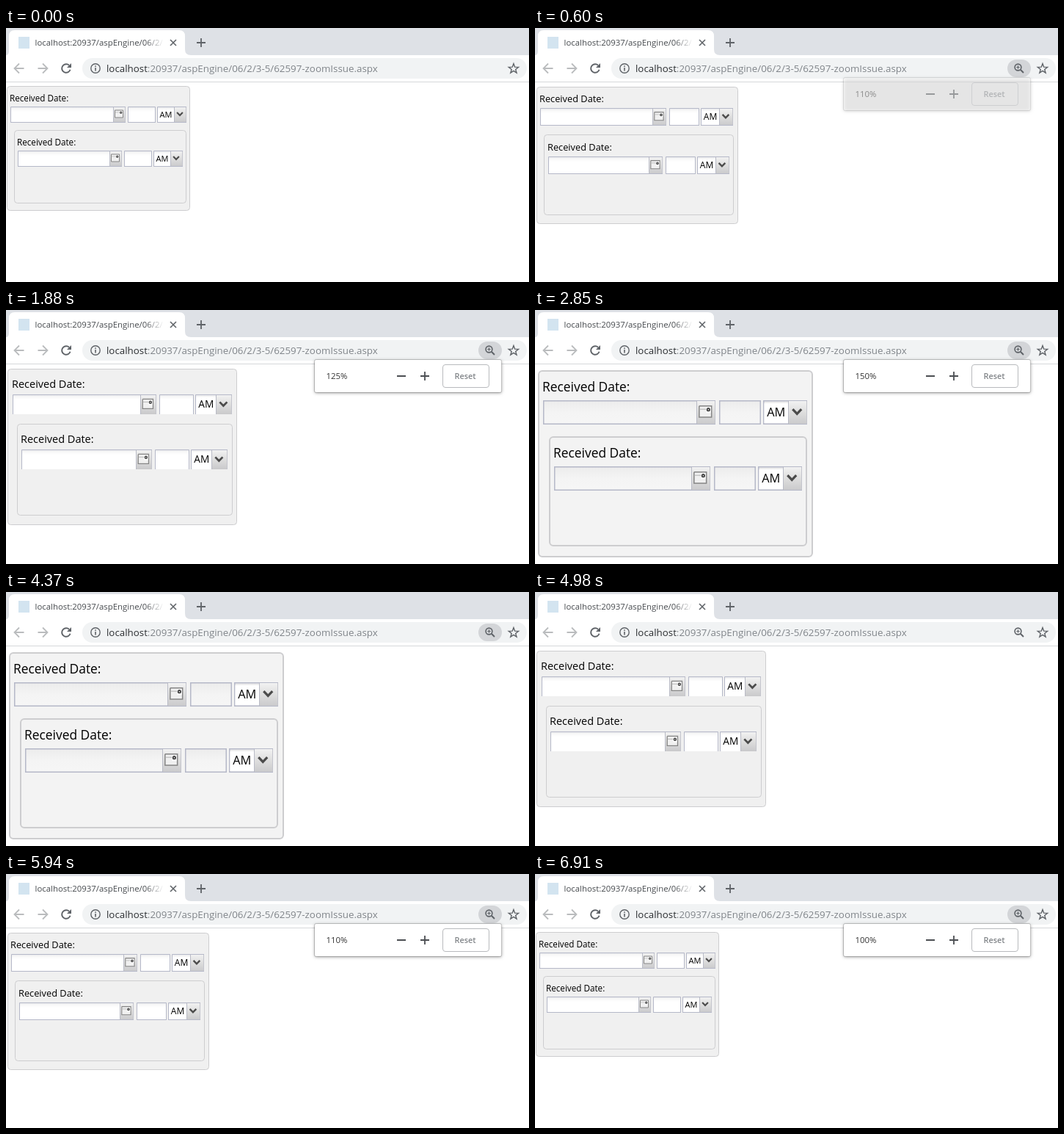
These frames come from a looping animation (713 px wide and 346 px high, 8000 ms). An HTML page with a canvas:

```html
<!DOCTYPE html>
<html lang="en">
<head>
<meta charset="utf-8">
<title>Browser zoom</title>
<style>
html, body { margin: 0; width: 100%; height: 100%; overflow: hidden; background: #fff; }
canvas { display: block; width: 713px; height: 346px; }
</style>
</head>
<body>
<canvas id="stage"></canvas>
<script>
const W = 713, H = 346, LOOP = 8000;
const UI = '"Open Sans", "Noto Sans", sans-serif';
const INK = '#5f6368';
const canvas = document.getElementById('stage');
const ctx = canvas.getContext('2d');
const dpr = window.devicePixelRatio || 1;
canvas.width = Math.round(W * dpr);
canvas.height = Math.round(H * dpr);

// Boxes are [left, top, right, bottom]; date, time and combo are horizontal spans.
const layouts = {
  100: { outer: [1, 79, 251, 249], inner: [11, 139, 246, 239], font: 11.7, base: 100,
         top: 107, bottom: 129, date: [6, 163], time: [166, 204], combo: [206, 246],
         button: 17, shift: [10, 60, -5], line: 1 },
  110: { outer: [2, 80, 277, 267], inner: [12, 145, 271, 255], font: 12.8, base: 101,
         top: 109, bottom: 133, date: [7, 179], time: [183, 224], combo: [226, 270],
         button: 19, shift: [11, 66, -5], line: 1 },
  125: { outer: [2, 80, 315, 293], inner: [15, 155, 309, 280], font: 14.5, base: 106,
         top: 115, bottom: 142, date: [9, 205], time: [209, 256], combo: [258, 308],
         button: 22, shift: [12, 75, -6.5], line: 1, cut: true },
  150: { outer: [4, 82, 379, 337], inner: [19, 172, 371, 322], font: 17.4, base: 111,
         top: 123, bottom: 156, date: [11, 246], time: [251, 308], combo: [311, 371],
         button: 26, shift: [15, 90, -7], line: 1.5, heavy: true }
};

// Each entry holds until the next one; popup is the bubble's opacity.
const timeline = [
  { at: 0, zoom: 100, label: 100, popup: 0, lens: false, lit: false },
  { at: 500, zoom: 110, label: 110, popup: 0, lens: true, lit: false },
  { at: 600, popup: 0.5, lit: true },
  { at: 700, popup: 1 },
  { at: 1780, label: 125 },
  { at: 1880, zoom: 125 },
  { at: 2850, zoom: 150, label: 150 },
  { at: 4370, popup: 0 },
  { at: 4670, lit: false },
  { at: 4980, zoom: 125, label: 125 },
  { at: 5090, popup: 0.5, lit: true },
  { at: 5190, popup: 1 },
  { at: 5940, zoom: 110, label: 110 },
  { at: 6910, zoom: 100, label: 100 }
];

function stateAt(t) {
  return Object.assign({}, ...timeline.filter(step => step.at <= t));
}

function fill(color, x, y, w, h) {
  ctx.fillStyle = color;
  ctx.fillRect(x, y, w, h);
}

function roundPath(x, y, w, h, r) {
  ctx.beginPath();
  ctx.moveTo(x + r, y);
  ctx.arcTo(x + w, y, x + w, y + h, r);
  ctx.arcTo(x + w, y + h, x, y + h, r);
  ctx.arcTo(x, y + h, x, y, r);
  ctx.arcTo(x, y, x + w, y, r);
  ctx.closePath();
}

function roundFill(color, x, y, w, h, r) {
  roundPath(x, y, w, h, r);
  ctx.fillStyle = color;
  ctx.fill();
}

function stroke(color, width) {
  ctx.strokeStyle = color;
  ctx.lineWidth = width;
  ctx.stroke();
}

function lines(color, width, ...paths) {
  ctx.beginPath();
  for (const [start, ...rest] of paths) {
    ctx.moveTo(...start);
    rest.forEach(p => ctx.lineTo(...p));
  }
  stroke(color, width);
}

function circle(x, y, r, color, width) {
  ctx.beginPath();
  ctx.arc(x, y, r, 0, Math.PI * 2);
  stroke(color, width);
}

function text(str, x, y, size, color, weight = 400) {
  ctx.font = `${weight} ${size}px ${UI}`;
  ctx.fillStyle = color;
  ctx.fillText(str, x, y);
  return x + ctx.measureText(str).width;
}

function vertical(y0, y1, ...stops) {
  const g = ctx.createLinearGradient(0, y0, 0, y1);
  stops.forEach((c, i) => g.addColorStop(i / (stops.length - 1), c));
  return g;
}

function drawTabs() {
  fill('#dee1e6', 0, 0, W, 37);
  ctx.fillStyle = '#fff';
  ctx.beginPath();
  ctx.moveTo(0, 37);
  ctx.quadraticCurveTo(4, 37, 4, 31);
  ctx.lineTo(4, 11);
  ctx.quadraticCurveTo(4, 3, 12, 3);
  ctx.lineTo(236, 3);
  ctx.quadraticCurveTo(244, 3, 244, 11);
  ctx.lineTo(244, 29);
  ctx.quadraticCurveTo(244, 37, 252, 37);
  ctx.fill();
  fill('#d3e4f0', 17, 12, 15, 16);

  const fade = ctx.createLinearGradient(190, 0, 215, 0);
  fade.addColorStop(0, '#45494d');
  fade.addColorStop(1, 'rgba(69,73,77,0)');
  text('localhost:20937/aspEngine/06/2/', 39.5, 24, 11.4, fade);
  lines(INK, 1.6, [[224, 16], [232, 24]], [[232, 16], [224, 24]]);
  lines(INK, 1.8, [[260, 20], [272, 20]], [[266, 14], [266, 26]]);
}

function arrow(x, dir) {
  lines('#babcbe', 1.8,
    [[x - 6.5 * dir, 55], [x + 6 * dir, 55]],
    [[x, 48.5], [x + 6.5 * dir, 55], [x, 61.5]]);
}

function drawReload() {
  ctx.beginPath();
  ctx.arc(82, 55, 5.8, 0.3, Math.PI * 1.75);
  stroke(INK, 1.9);
  ctx.fillStyle = INK;
  ctx.beginPath();
  ctx.moveTo(89, 48);
  ctx.lineTo(89, 54);
  ctx.lineTo(83, 54);
  ctx.fill();
}

function drawStar(x, y) {
  ctx.beginPath();
  for (let i = 0; i < 10; i++) {
    const r = i % 2 ? 2.9 : 7;
    const a = -Math.PI / 2 + i * Math.PI / 5;
    ctx.lineTo(x + r * Math.cos(a), y + r * Math.sin(a));
  }
  ctx.closePath();
  stroke(INK, 1.4);
}

function drawLens() {
  circle(658.5, 53.5, 4.4, INK, 1.6);
  lines(INK, 2, [[661.8, 56.8], [666, 61]]);
  lines(INK, 1.1, [[656.3, 53.5], [660.7, 53.5]], [[658.5, 51.3], [658.5, 55.7]]);
}

function drawToolbar(s) {
  fill('#fff', 0, 37, W, 36);
  fill('#d6d8db', 0, 73, W, 1);
  arrow(18, -1);
  arrow(50, 1);
  drawReload();
  roundFill('#f1f3f4', 104, 41, 606, 28, 14);
  circle(122, 55, 6.2, INK, 1.4);
  fill(INK, 121.2, 54, 1.6, 4.5);
  fill(INK, 121.2, 51.3, 1.6, 1.6);
  const x = text('localhost', 137, 60, 13.33, '#2b2e31');
  text(':20937/aspEngine/06/2/3-5/62597-zoomIssue.aspx', x, 60, 13.33, '#80858a');
  if (s.lit) roundFill('#d3d5d8', 644, 43, 32, 24, 12);
  if (s.lens) drawLens();
  drawStar(692, 55.5);
}

function panel([l, t, r, b], heavy) {
  const width = heavy ? 2 : 1;
  const edge = width / 2;
  roundPath(l + edge, t + edge, r - l - width, b - t - width, heavy ? 5 : 4);
  ctx.fillStyle = heavy ? '#f3f3f3' : '#f0f0f0';
  ctx.fill();
  stroke('#cdcdcf', width);
}

function field(l, r, c) {
  const { top, bottom, line } = c;
  ctx.fillStyle = c.heavy
    ? vertical(top, bottom, '#ececec', '#f4f4f4', '#f6f6f6')
    : vertical(top, top + 7, '#e6e7e9', '#f8f8f8', '#fff');
  ctx.fillRect(l, top, r - l, bottom - top);
  const e = line / 2;
  const path = [[l + e, bottom], [l + e, top + e], [r - e, top + e], [r - e, bottom]];
  lines('#b5b8c8', line, path);
  if (!c.cut) fill('#b5b8c8', l, bottom - line, r - l, line);
}

function button(r, c) {
  const l = r - c.button, h = c.bottom - c.top;
  fill(vertical(c.top, c.bottom, '#f3f3f3', '#dedede', '#c9c9cb'), l, c.top, c.button, h);
  fill('#b9bbc6', l, c.top, 1, h);
  fill('#c4c5cd', r - 1, c.top, 1, h);
  fill('#b5b8c8', l, c.top, c.button, 1);
  if (!c.cut) fill('#b5b8c8', l, c.bottom - 1, c.button, 1);
}

function calendar(r, c) {
  const k = c.button / 17, x = r - 14.5 * k, y = c.top + 5 * k;
  const w = 11 * k, h = 10 * k;
  fill('#f0f0f0', x, y, w, h);
  lines('#858585', k, [[x, y], [x + w, y], [x + w, y + h], [x, y + h], [x, y]]);
  fill('#b4b4b4', x + k / 2, y + 2.6 * k, w * 0.5, 0.7 * k);
  fill('#fff', x + 6.3 * k, y + 1.2 * k, 4 * k, 5 * k);
  circle(x + 8.2 * k, y + 3.3 * k, 1.1 * k, '#444', 1.2 * k);
}

function chevron(r, c) {
  const k = c.button / 17, x = r - 9 * k, y = c.top + 10 * k;
  lines('#4b4b4b', 2.1 * k, [[x - 3.9 * k, y - 2 * k], [x, y + 2 * k], [x + 3.9 * k, y - 2 * k]]);
}

function fieldRow(c) {
  text('Received Date:', c.date[0] - 1, c.base, c.font, '#000');
  field(...c.date, c);
  button(c.date[1], c);
  calendar(c.date[1], c);
  field(...c.time, c);

  const [l, r] = c.combo;
  field(l, r, c);
  fill('#fff', l + c.line, c.top + 4, r - l - c.button - c.line, c.bottom - c.top - 6);
  ctx.save();
  ctx.beginPath();
  ctx.rect(l, c.top, r - l - c.button - 1, c.bottom - c.top);
  ctx.clip();
  const size = c.font * 0.94;
  text('AM', l + c.font * 0.3, (c.top + c.bottom) / 2 + size * 0.36, size, '#000');
  ctx.restore();
  button(r, c);
  chevron(r, c);
}

function shifted(c) {
  const [dx, dy, back] = c.shift;
  const move = span => span.map(v => Math.round(v + back));
  return { ...c, base: c.base + dy, top: c.top + dy, bottom: c.bottom + dy,
           date: [c.date[0] + dx, Math.round(c.date[1] + back)],
           time: move(c.time), combo: move(c.combo) };
}

function drawPage(zoom) {
  const c = layouts[zoom];
  fill('#fff', 0, 74, W, H - 74);
  panel(c.outer, c.heavy);
  panel(c.inner, c.heavy);
  fieldRow(c);
  fieldRow(shifted(c));
}

function drawPopup(s) {
  if (!s.popup) return;
  ctx.save();
  ctx.globalAlpha = s.popup;
  ctx.save();
  ctx.shadowColor = 'rgba(0,0,0,.4)';
  ctx.shadowBlur = 4 * dpr;
  ctx.shadowOffsetY = dpr;
  roundFill('#fff', 421, 68, 254.5, 44, 2);
  ctx.restore();
  roundPath(420.5, 67.5, 255, 45, 2);
  stroke('rgba(0,0,0,.16)', 1);
  text(s.label + '%', 436.5, 94, 11.4, '#333');
  lines('#4b4e52', 1.8, [[533, 90], [545, 90]],
    [[565, 90], [577, 90]], [[571, 84], [571, 96]]);
  roundPath(595.5, 74.5, 63, 31, 3.5);
  stroke('#b8babd', 1);
  text('Reset', 611.5, 94, 10.9, '#808488', 600);
  ctx.restore();
}

function frame(now) {
  const s = stateAt(now % LOOP);
  ctx.setTransform(dpr, 0, 0, dpr, 0, 0);
  drawPage(s.zoom);
  drawTabs();
  drawToolbar(s);
  drawPopup(s);
}

const start = performance.now();
function tick() {
  frame(performance.now() - start);
  requestAnimationFrame(tick);
}
tick();
</script>
</body>
</html>
```
